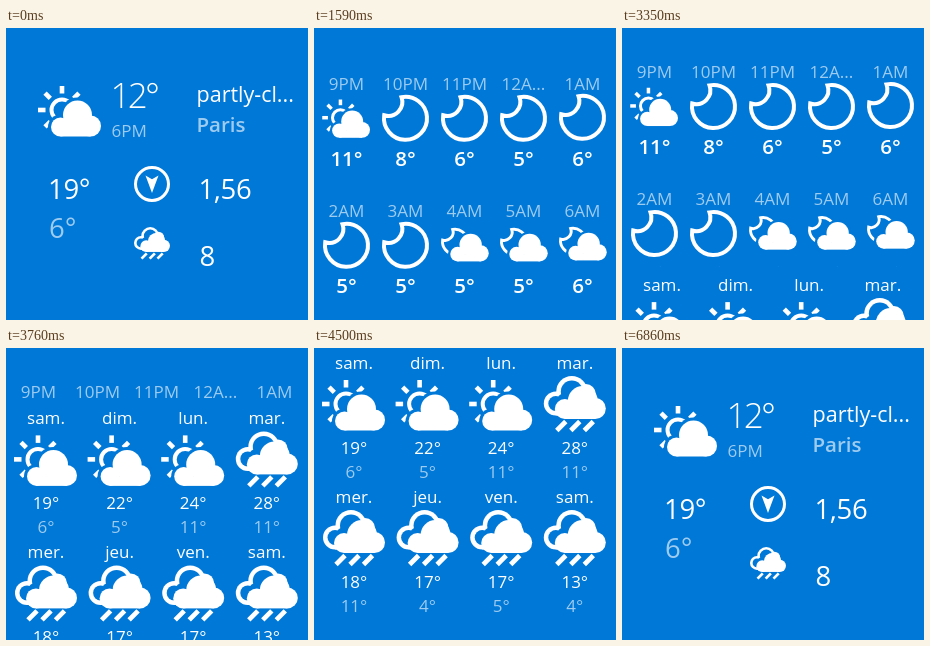
Write an HTML page that moves like this. It is 302x292 px and loops after 7190 ms.

```html
<!DOCTYPE html>
<html lang="en">
<head>
<meta charset="utf-8">
<title>Weather tile</title>
<style>
  html, body { margin: 0; width: 100%; height: 100%; overflow: hidden; background: #0078d7; }
  svg { display: block; width: 302px; height: 292px; overflow: hidden; }
  text { fill: #fff; font-family: "Open Sans", "Noto Sans", sans-serif; }
  .dim { fill-opacity: .62; }
</style>
</head>
<body>
<svg id="tile" viewBox="0 0 302 292" xmlns="http://www.w3.org/2000/svg"></svg>
<script>
const BG = '#0078d7';
const tile = document.getElementById('tile');

// ---- drawing helpers ----
const text = (x, y, size, str, { dim = false, weight = 400, anchor = 'start', spacing = 0 } = {}) =>
  `<text x="${x}" y="${y}" font-size="${size}" font-weight="${weight}" text-anchor="${anchor}"
    letter-spacing="${spacing}"${dim ? ' class="dim"' : ''}>${str}</text>`;

const at = (x, y, scale, body) => `<g transform="translate(${x} ${y}) scale(${scale})">${body}</g>`;

// Union of lobes [x, y, r]; the first and last share a flat base.
function cloud(lobes, fill, grow = 0) {
  const [left, right] = [lobes[0], lobes[lobes.length - 1]];
  const base = left[1] + left[2] + grow;
  const circles = lobes.map(([x, y, r]) => `<circle cx="${x}" cy="${y}" r="${r + grow}"/>`).join('');
  return `<g fill="${fill}">${circles}
    <rect x="${left[0]}" y="${left[1]}" width="${right[0] - left[0]}" height="${base - left[1]}"/></g>`;
}

const haloCloud = lobes => cloud(lobes, BG, 3) + cloud(lobes, '#fff');

const frontLobes = [[21.5, 42, 9.5], [38.5, 30, 14.5], [51.5, 41, 10.5]];
const rainLobes = [[21, 33, 10], [39, 25, 15], [51.5, 32.5, 10.5]];
const backLobes = [[12, 27.5, 12], [19, 23, 9.5], [28, 15.5, 15.5], [42, 18, 10]];

function sun() {
  const rays = [180, 135, -135, -90, -45].map(a =>
    `<path d="M16.5 0H24" transform="translate(23 25) rotate(${a})"/>`).join('');
  return `<g fill="none" stroke="#fff" stroke-width="4.6">${rays}
    <circle cx="23" cy="25" r="10.5" stroke-width="4"/></g>` + haloCloud(frontLobes);
}

function rain() {
  const drops = [0, 14, 27.5].map(dx => `M${22 + dx} 45.5l-9 9`).join('');
  return cloud(backLobes, '#fff') + cloud(backLobes, BG, -4.5) + cloud(rainLobes, '#fff') +
    `<path d="${drops}" stroke="#fff" stroke-width="4.8"/>`;
}

const moon = (width = 4) =>
  `<path d="M-4-21.1A21.5 21.5 0 1 1-21.3-3A14 14 0 0 0-4-21.1Z"
    fill="none" stroke="#fff" stroke-width="${width}"/>`;

const cloudyNight = () => at(14, 13, .58, moon(5)) + at(0, -7, .77, haloCloud(frontLobes));

const compass = () =>
  `<circle cx="146" cy="156" r="16.5" fill="none" stroke="#fff" stroke-width="3"/>
   <path d="M139.5 147.5L146 151.3L152.5 147.5L146 165Z" fill="#fff"/>`;

// ---- pages ----
function currentPage() {
  return at(33, 57, 1, sun()) +
    text(104.5, 79.5, 35, '12°', { weight: 300, spacing: -2.7 }) +
    text(105.5, 109, 17, '6PM', { dim: true }) +
    text(190.5, 74, 21.5, 'partly-cl...') +
    text(190.5, 104, 20.5, 'Paris', { dim: true, weight: 600 }) +
    text(42, 171, 27.5, '19°', { spacing: -.3 }) +
    text(43, 210, 27.5, '6°', { dim: true }) +
    compass() +
    text(192.5, 171, 27.5, '1,56', { spacing: -.2 }) +
    at(128, 199, .58, rain()) +
    text(193.5, 238, 27.5, '8');
}

function hourlyPage() {
  const hours = ['9PM', '10PM', '11PM', '12A...', '1AM', '2AM', '3AM', '4AM', '5AM', '6AM'];
  const temps = [11, 8, 6, 5, 6, 5, 5, 5, 5, 6];
  return hours.map((hour, i) => {
    const col = i % 5, row = Math.floor(i / 5);
    const x = 32.5 + 59 * col, y = 127 * row, lift = col === 4 ? 1 : 0;
    const icon = i === 0 ? at(9, 59, .758, sun())
      : i > 6 ? at(x - 23.5, 189 - lift, 1, cloudyNight())
      : at(x, 78.5 + y - lift, 1, moon());
    return text(x, 50 + y, 17, hour, { dim: true, anchor: 'middle' }) + icon +
      text(x, 126 + y, 20.5, temps[i] + '°', { weight: 600, anchor: 'middle' });
  }).join('');
}

function dailyPage() {
  const days = ['sam.', 'dim.', 'lun.', 'mar.', 'mer.', 'jeu.', 'ven.', 'sam.'];
  const highs = [19, 22, 24, 28, 18, 17, 17, 13];
  const lows = [6, 5, 11, 11, 11, 4, 5, 4];
  return days.map((day, i) => {
    const x = 40 + 73.6 * (i % 4), y = i < 4 ? 0 : 134;
    const mid = { anchor: 'middle' };
    return text(x, 21 + y, 17, day, mid) +
      at(x - 31, (i < 3 ? 31 : 28) + y, 1, i < 3 ? sun() : rain()) +
      text(x, 106 + y, 17, highs[i] + '°', mid) +
      text(x, 130 + y, 17, lows[i] + '°', { ...mid, dim: true });
  }).join('');
}

const pages = [currentPage, hourlyPage, dailyPage].map(draw => {
  const g = document.createElementNS('http://www.w3.org/2000/svg', 'g');
  g.innerHTML = `<rect y="-3.5" width="302" height="300" fill="${BG}"/>` + draw();
  return g;
});

// ---- motion: each page slides up over the previous one ----
const LOOP = 7190, SLIDE = 1295, TRAVEL = 301, RATE = .00555;
const slides = [
  { from: 0, to: 1, start: 880, end: 2000 },
  { from: 1, to: 2, start: 3250, end: 4500 },
  { from: 2, to: 0, start: 5660, end: 6860 },
];

// Critically damped settling, corrected to finish at exactly zero.
const damped = ms => (1 + RATE * ms) * Math.exp(-RATE * ms);
const offset = ms => TRAVEL * (damped(ms) - damped(SLIDE) * ms / SLIDE);

let order = '';
function stack(...ids) {
  if (order === ids.join()) return;
  order = ids.join();
  tile.replaceChildren(...ids.map(id => pages[id]));
}

function place(id, y) {
  pages[id].setAttribute('transform', `translate(0 ${y.toFixed(2)})`);
}

function render(t) {
  const slide = slides.find(s => t >= s.start && t < s.end);
  if (slide) {
    stack(slide.from, slide.to);
    place(slide.from, 0);
    place(slide.to, offset(t - slide.end + SLIDE));
  } else {
    const done = slides.filter(s => t >= s.end).pop();
    const id = done ? done.to : 0;
    stack(id);
    place(id, 0);
  }
}

const began = performance.now();
function tick() {
  render((performance.now() - began) % LOOP);
  requestAnimationFrame(tick);
}
tick();
</script>
</body>
</html>
```
